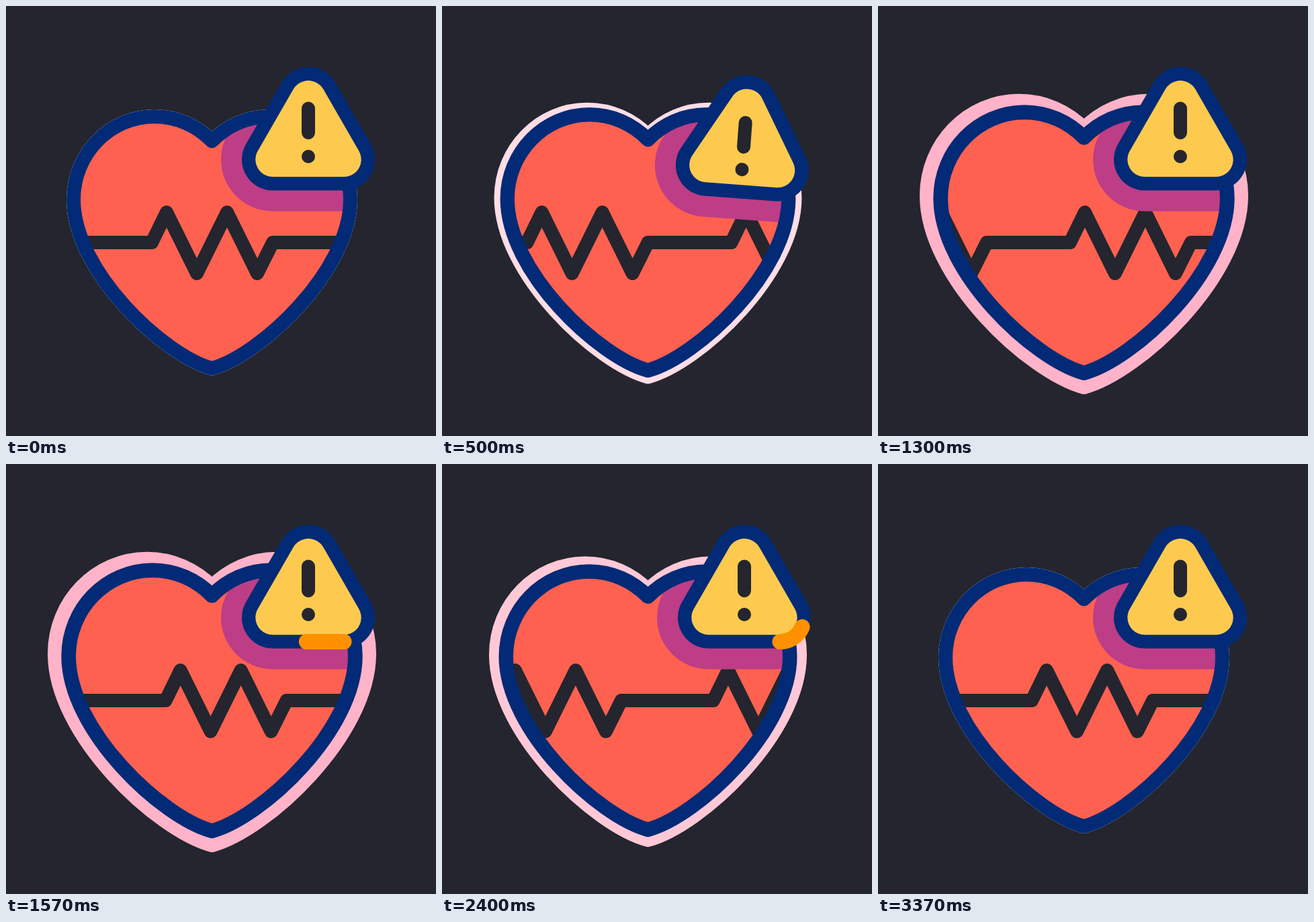
Write an HTML page with a canvas that moves like this. It is 640 px wide and 640 px high and loops after 3400 ms.

```html
<!DOCTYPE html>
<html lang="en">
<head>
<meta charset="utf-8">
<title>Heart warning</title>
<style>
  html, body { margin: 0; height: 100%; overflow: hidden; background: #24252e; }
  canvas { display: block; width: 640px; height: 640px; }
</style>
</head>
<body>
<canvas width="640" height="640"></canvas>
<script>
const ctx = document.querySelector('canvas').getContext('2d');
const LOOP = 3400, FRAMES = 102, BEAT = 34;
const BG = '#24252e', NAVY = '#022a76', RED = '#ff6150';
const PURPLE = '#bd3d86', YELLOW = '#fdca4f', ORANGE = '#ff9100';

const heart = new Path2D(`M306.5 201C284 178 254 164.5 221 164.5
  C154.5 164.5 100.5 220 100.5 288C100.5 395 235 520 306.5 539.3
  C378 520 512.5 395 512.5 288C512.5 220 458.5 164.5 392 164.5
  C359 164.5 329 178 306.5 201Z`);

const triangle = new Path2D('M450 136.7L503 228.5L397 228.5Z');
const bar = new Path2D('M450 152.5V188.5');
const dot = new Path2D('M450 224V224.01');

const pulse = new Path2D('M-100 352' + [239, 543, 860].map(x =>
  `H${x - 22}L${x} 307L${x + 45} 398L${x + 90} 307L${x + 135} 398L${x + 158} 352`
).join('') + 'H1400');

// Rounded border of the sign, clockwise from its bottom right corner
const border = new Path2D();
const R = 36, PERIMETER = 318 + 2 * Math.PI * R;
border.moveTo(503, 228.5 + R);
[[397, 228.5, 3], [450, 136.7, 7], [503, 228.5, 11]].forEach(([x, y, a]) =>
  border.arc(x, y, R, a * Math.PI / 6, (a + 4) * Math.PI / 6));

const smooth = u => {
  u = Math.min(1, Math.max(0, u));
  return u * u * (3 - 2 * u);
};

function tween(keys, f) {
  let value = keys[0][1];
  for (let i = 1; i < keys.length; i++) {
    const [f0, v0] = keys[i - 1], [f1, v1] = keys[i];
    value += (v1 - v0) * smooth((f - f0) / (f1 - f0));
  }
  return value;
}

function layer(draw) {
  ctx.save();
  draw();
  ctx.restore();
}

function stroke(path, color, width) {
  ctx.strokeStyle = color;
  ctx.lineWidth = width;
  ctx.stroke(path);
}

function fill(path, color) {
  ctx.fillStyle = color;
  ctx.fill(path);
}

function scaleAbout(x, y, s) {
  ctx.translate(x, y);
  ctx.scale(s, s);
  ctx.translate(-x, -y);
}

function drawFrame(f) {
  const beat = tween([[0, 0], [9, 1], [18, 0]], f % BEAT);
  const drop = tween([[0, 0], [14, 13], [24, -13], [32, 0]], f);
  const tilt = tween([[0, 0], [16, 4.3], [28, -5], [35, 0]], f);

  const growHeart = () => scaleAbout(306.5, 345, 1 + 0.061 * beat);
  const placeSign = () => {
    ctx.translate(450, 184 + drop);
    ctx.rotate(tilt * Math.PI / 180);
    ctx.translate(-450, -184);
  };

  ctx.lineJoin = ctx.lineCap = 'round';
  ctx.fillStyle = BG;
  ctx.fillRect(0, 0, 640, 640);

  layer(() => {
    const color = `rgb(255, ${255 - 131 * beat}, ${255 - 95 * beat})`;
    scaleAbout(306.5, 333, 1 + 0.222 * beat);
    fill(heart, color);
    stroke(heart, color, 21);
  });

  layer(() => {
    growHeart();
    fill(heart, RED);
    ctx.clip(heart);
    ctx.setTransform(1, 0, 0, 1, -6.03 * f, 0);
    stroke(pulse, BG, 20);
    ctx.resetTransform();
    placeSign();
    fill(triangle, PURPLE);
    stroke(triangle, PURPLE, 154);
  });

  layer(() => {
    growHeart();
    stroke(heart, NAVY, 21);
  });

  layer(() => {
    placeSign();
    stroke(triangle, NAVY, 92);
    stroke(triangle, YELLOW, 51.4);
    fill(triangle, YELLOW);

    const head = smooth((f - 42.6) / 22.2), tail = smooth((f - 53.6) / 22.2);
    if (head > tail) layer(() => {
      ctx.setLineDash([(head - tail) * PERIMETER, 2 * PERIMETER]);
      ctx.lineDashOffset = -tail * PERIMETER;
      stroke(border, ORANGE, 23);
    });

    ctx.translate(0, 1.7 * tilt);
    stroke(dot, BG, 20);
    ctx.translate(0, 0.4 * tilt);
    stroke(bar, BG, 20);
  });
}

const start = performance.now();
function tick() {
  const t = (performance.now() - start) % LOOP;
  drawFrame(Math.min(FRAMES - 1, Math.floor((t + 4) * FRAMES / LOOP)));
  requestAnimationFrame(tick);
}
tick();
</script>
</body>
</html>
```
